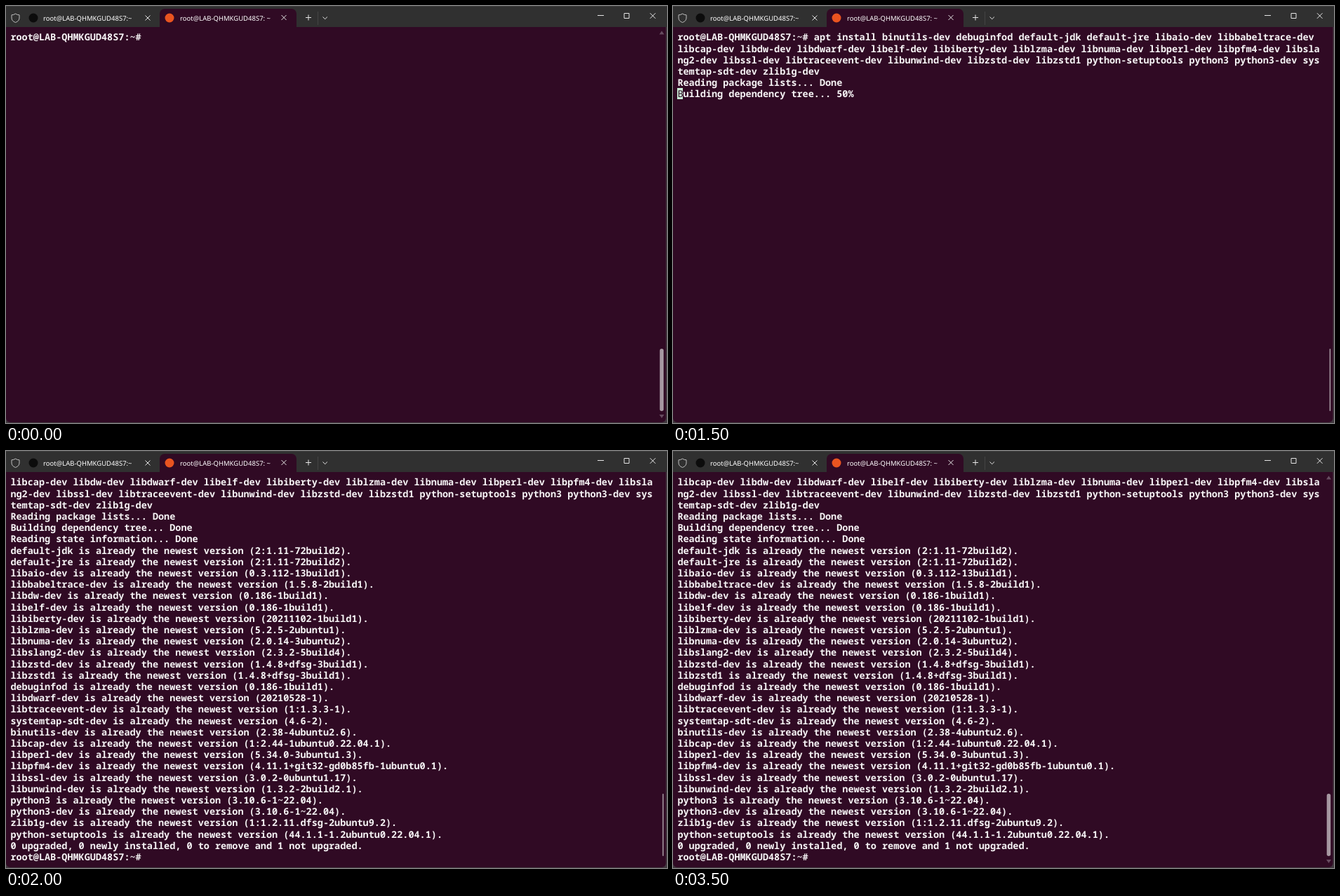
An HTML page with a canvas that plays this animation: 942x595 px, repeating every 3.6 s.

```html
<!DOCTYPE html>
<html lang="en">
<head>
<meta charset="utf-8">
<title>Terminal</title>
<style>
  html, body { margin: 0; width: 100%; height: 100%; overflow: hidden; background: #40383e; }
  canvas { display: block; }
</style>
</head>
<body>
<canvas id="stage" width="942" height="595"></canvas>
<script>
const ctx = document.getElementById('stage').getContext('2d');
const LOOP = 3600, COLS = 113, ROWS = 34;
const CELL_W = 8.1, CELL_H = 16.2, LEFT = 6.4, TOP = 36.4, BASELINE = 13;
const PURPLE = '#300a24', WHITE = '#f6f4f5', MINT = '#cbf0d8', BAR = '#303030';

const host = 'root@LAB-QHMKGUD48S7';
const prompt = host + ':~# ';
const command = 'apt install binutils-dev debuginfod default-jdk default-jre libaio-dev ' +
  'libbabeltrace-dev libcap-dev libdw-dev libdwarf-dev libelf-dev libiberty-dev liblzma-dev ' +
  'libnuma-dev libperl-dev libpfm4-dev libslang2-dev libssl-dev libtraceevent-dev libunwind-dev ' +
  'libzstd-dev libzstd1 python-setuptools python3 python3-dev systemtap-sdt-dev zlib1g-dev';
const packages = `default-jdk 2:1.11-72build2
default-jre 2:1.11-72build2
libaio-dev 0.3.112-13build1
libbabeltrace-dev 1.5.8-2build1
libdw-dev 0.186-1build1
libelf-dev 0.186-1build1
libiberty-dev 20211102-1build1
liblzma-dev 5.2.5-2ubuntu1
libnuma-dev 2.0.14-3ubuntu2
libslang2-dev 2.3.2-5build4
libzstd-dev 1.4.8+dfsg-3build1
libzstd1 1.4.8+dfsg-3build1
debuginfod 0.186-1build1
libdwarf-dev 20210528-1
libtraceevent-dev 1:1.3.3-1
systemtap-sdt-dev 4.6-2
binutils-dev 2.38-4ubuntu2.6
libcap-dev 1:2.44-1ubuntu0.22.04.1
libperl-dev 5.34.0-3ubuntu1.3
libpfm4-dev 4.11.1+git32-gd0b85fb-1ubuntu0.1
libssl-dev 3.0.2-0ubuntu1.17
libunwind-dev 1.3.2-2build2.1
python3 3.10.6-1~22.04
python3-dev 3.10.6-1~22.04
zlib1g-dev 1:1.2.11.dfsg-2ubuntu9.2
python-setuptools 44.1.1-1.2ubuntu0.22.04.1`.split('\n').map(entry => {
  const [name, version] = entry.split(' ');
  return `${name} is already the newest version (${version}).`;
});

const typed = (prompt + command).match(new RegExp(`.{1,${COLS}}`, 'g'));
const lists = [...typed, 'Reading package lists... Done'];
const checked = [...lists, 'Building dependency tree... Done',
  'Reading state information... Done', ...packages];
const summary = [...checked, '0 upgraded, 0 newly installed, 0 to remove and 1 not upgraded.'];

// Terminal contents at time t; cursor is [column, row] before scrolling.
function screenAt(t) {
  if (t < 1000) return { lines: [prompt], cursor: t >= 200 && [prompt.length, 0] };
  if (t < 1500) return { lines: typed, cursor: [typed[3].length, 3], selected: true };
  if (t < 1600) return { lines: [...lists, 'Building dependency tree... 50%'], cursor: [0, 5] };
  if (t < 1700) return { lines: [...checked, ''], cursor: [0, checked.length] };
  if (t < 1800) return { lines: [...summary, ''], cursor: [0, summary.length] };
  const visible = t < 2000 || (t >= 2500 && t < 3100);
  return { lines: [...summary, prompt], cursor: visible && [prompt.length, summary.length] };
}

function box(x, y, w, h, radius, color) {
  ctx.fillStyle = color;
  ctx.beginPath();
  ctx.roundRect(x, y, w, h, radius);
  ctx.fill();
}

function stroke(path, color = '#e6e6e6', width = 1) {
  ctx.strokeStyle = color;
  ctx.lineWidth = width;
  ctx.stroke(new Path2D(path));
}

function dot(x, y, color) {
  box(x - 6.5, y - 6.5, 13, 13, 6.5, color);
}

function cross(x, y, r) {
  stroke(`M${x - r} ${y - r}l${2 * r} ${2 * r}m0 ${-2 * r}l${-2 * r} ${2 * r}`);
}

function label(text, x, weight) {
  ctx.font = `${weight} 9.5px "Noto Sans", "Open Sans", sans-serif`;
  ctx.fillStyle = '#fff';
  ctx.fillText(text, x, 20.7);
}

function drawWindow() {
  ctx.fillStyle = '#40383e';
  ctx.fillRect(0, 0, 942, 595);
  box(0, 0, 940.5, 594, [0, 0, 6, 6], PURPLE);
  box(0, 0, 942, 30, 0, BAR);
  box(0, 0, 942, 1, 0, '#3d3d3d');
  box(219, 4, 195, 26, [7, 7, 0, 0], PURPLE);

  stroke('M13.5 11Q16 12.8 19 12.8V17Q19 21.5 13.5 23.5Q8 21.5 8 17V12.8Q11 12.8 13.5 11Z', '#bdbdbd');
  dot(39, 17, '#0c0c0c');
  label(host + ':~', 53, 400);
  cross(202, 17, 3.5);
  dot(233, 17, '#e95420');
  label(host + ': ~', 248, 500);
  cross(396, 16.5, 3.5);

  stroke('M427 16.5h8M431 12.5v8');
  stroke('M444.5 8v19', '#444');
  stroke('M451.5 15.5l3.2 3.2l3.2 -3.2');
  stroke('M843 13.5h9');
  stroke('M881 10.5h7v7h-7z');
  cross(921.7, 14, 3.8);
}

function drawTerminal({ lines, cursor, selected }) {
  const scroll = Math.max(0, lines.length - ROWS);
  const cellX = col => LEFT + col * CELL_W;
  const cellY = row => TOP + (row - scroll) * CELL_H;
  const isSelected = (col, row) => selected && (row > 0 || col >= prompt.length);

  if (selected) lines.forEach((line, row) => {
    const start = row ? 0 : prompt.length;
    const end = row < 3 ? COLS : line.length;
    box(cellX(start), cellY(row), (end - start) * CELL_W, CELL_H + 0.3, 0, '#fff');
  });
  if (cursor) {
    const x = Math.round(cellX(cursor[0])), y = Math.round(cellY(cursor[1]));
    box(x, y, 8, 16, 0, MINT);
  }

  lines.slice(scroll).forEach((line, i) => {
    const row = i + scroll;
    [...line].forEach((char, col) => {
      const dark = isSelected(col, row) || (cursor && cursor[0] === col && cursor[1] === row);
      ctx.font = `${dark ? 500 : 600} 13.5px "Noto Sans Mono", "DejaVu Sans Mono", monospace`;
      ctx.fillStyle = dark ? PURPLE : WHITE;
      ctx.fillText(char, cellX(col), cellY(row) + BASELINE);
    });
  });
}

function drawScrollbar(t) {
  // 1 is fully expanded, 0 is the thin resting line
  const open = t < 500 || t >= 3300 ? 1 : t < 600 ? 0.5 : 0;
  const width = 1.6 + 3.9 * open;
  box(937.2 - width, 489, width, 89, width / 2, '#a697a1');
  if (!open) return;
  ctx.globalAlpha = open;
  ctx.fillStyle = '#674c60';
  ctx.fill(new Path2D('M934.5 35.5l3.5 5h-7zM934.5 588l3.5 -5h-7z'));
  ctx.globalAlpha = 1;
}

function draw(now) {
  const t = now % LOOP;
  ctx.textRendering = 'geometricPrecision';
  drawWindow();
  drawTerminal(screenAt(t));
  drawScrollbar(t);
}

const start = performance.now();
function tick() {
  draw(performance.now() - start);
  requestAnimationFrame(tick);
}
tick();
</script>
</body>
</html>
```
